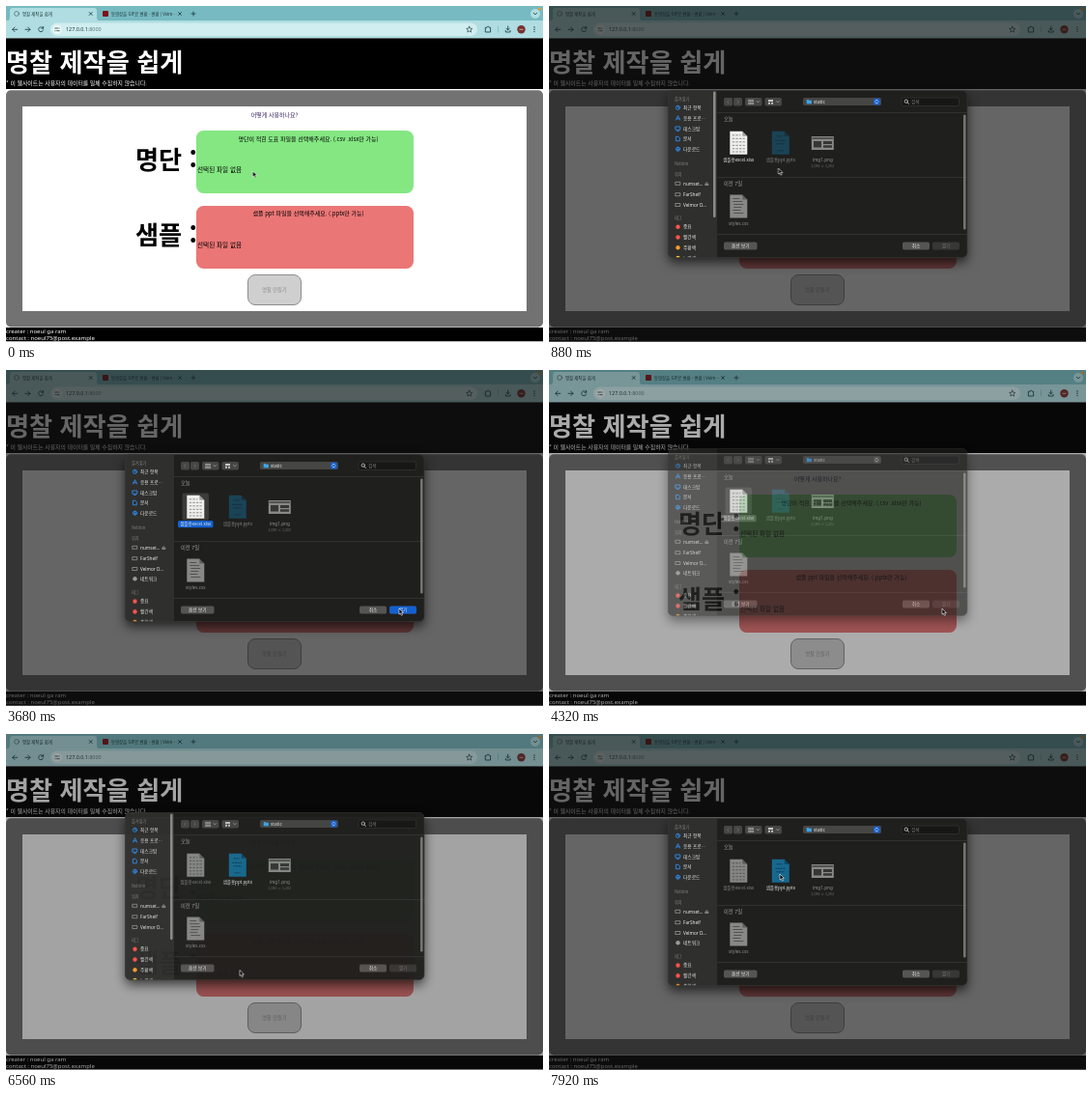
An HTML page that plays this animation: 556x348 px, repeating every 8000 ms.

```html
<!DOCTYPE html>
<html lang="ko">
<head>
<meta charset="utf-8">
<title>명찰 제작을 쉽게</title>
<style>
html, body { margin: 0; width: 100%; height: 100%; overflow: hidden; background: #000; }
svg { display: block; width: 556px; height: 348px; }
text { font: 6px "Noto Sans CJK KR", "Noto Sans CJK", "Noto Sans", sans-serif; white-space: pre; }
.big { font-size: 26.2px; font-weight: 700; }
.file { font-size: 6.6px; }
.latin { font-family: "Noto Sans", "Noto Sans CJK KR", sans-serif; }
.tab { font-size: 4.4px; }
.mid { text-anchor: middle; }
.line { fill: none; stroke: currentColor; stroke-width: .9; stroke-linecap: round; stroke-linejoin: round; }
#dialog text { font-size: 4.7px; font-weight: 500; fill: #ececea; }
#dialog .head { font-size: 4.2px; fill: #81817f; }
#dialog .tiny { font-size: 3.6px; fill: #72726f; }
#dialog .soft { font-size: 5.3px; fill: #a0a09e; }
#dialog .name { font-size: 4.5px; }
.shadow { filter: drop-shadow(0 5px 6px #000a); }

/* One percent of the loop is 80 ms. */
.anim { animation: 8s linear infinite; }
.hard { animation-timing-function: step-end; }
#cursor { animation-name: cursor; }
#dim { animation-name: dim; }
#dialog { animation-name: sheet; }
.before { animation-name: before; }
.after { animation-name: after; }
.sheetFile { animation-name: firstPick; }
.slideFile { animation-name: secondPick; }
.selected { animation-name: selected; }
.ready { animation-name: ready; }
.accent { animation-name: accent; }
.network { animation-name: network; }
.tags { animation-name: tags; }
.sideBar { animation-name: sideBar; }

@keyframes cursor {
  0%, 2% { transform: translate(255.5px, 171px); }
  8%, 13% { transform: translate(237.5px, 168px); }
  21%, 33% { transform: translate(197px, 138px); }
  36% { transform: translate(225px, 158px); }
  41% { transform: translate(360px, 232px); }
  45%, 62% { transform: translate(407px, 247px); }
  66% { transform: translate(330px, 243px); }
  70% { transform: translate(268.5px, 240px); }
  74% { transform: translate(249px, 243px); }
  77%, 85% { transform: translate(242px, 244.5px); }
  88% { transform: translate(241px, 210px); }
  93%, 100% { transform: translate(239px, 145px); }
}
@keyframes dim {
  0%, 3.99% { opacity: 0; }
  4% { opacity: .39; }
  8%, 53% { opacity: .655; }
  54% { opacity: .36; }
  57%, 81.99% { opacity: 0; }
  82% { opacity: .39; }
  86%, 100% { opacity: .655; }
}
@keyframes sheet {
  0%, 3.99% { opacity: 0; transform: translateY(-6px); }
  4% { opacity: .96; transform: translateY(-6px); }
  8%, 52% { opacity: 1; transform: none; }
  54% { opacity: .65; transform: translateY(-6px); }
  57%, 81.99% { opacity: 0; transform: translateY(-6px); }
  82% { opacity: .97; transform: translateY(-6px); }
  86%, 100% { opacity: 1; transform: none; }
}
@keyframes before { 0% { opacity: 1; } 58%, 100% { opacity: 0; } }
@keyframes after { 0% { opacity: 0; } 58%, 100% { opacity: 1; } }
@keyframes firstPick { 0% { opacity: 1; } 60%, 100% { opacity: .5; } }
@keyframes secondPick { 0% { opacity: .5; } 60%, 100% { opacity: 1; } }
@keyframes selected { 0% { opacity: 0; } 23% { opacity: 1; } 60%, 100% { opacity: 0; } }
@keyframes ready { 0% { opacity: 0; } 23% { opacity: 1; } 53%, 100% { opacity: 0; } }
@keyframes accent { 0% { fill: #1460cf; } 53% { fill: #5a5a58; } 60%, 100% { fill: #1460cf; } }
@keyframes network { 0% { opacity: 0; } 13% { opacity: 1; } 82% { opacity: 0; } 90%, 100% { opacity: 1; } }
@keyframes tags {
  0% { transform: none; }
  13% { transform: translateY(10.8px); }
  82% { transform: none; }
  90%, 100% { transform: translateY(10.8px); }
}
@keyframes sideBar {
  0%, 14% { opacity: 1; }
  17%, 81.99% { opacity: 0; }
  82%, 89% { opacity: 1; }
  92%, 100% { opacity: 0; }
}
</style>
</head>
<body>
<svg viewBox="0 0 556 348">
  <defs>
    <clipPath id="sheetClip"><rect x="123.5" y="87.5" width="309.5" height="173" rx="5"/></clipPath>
    <path id="page" d="M-9-12H4L9-7V12H-9Z"/>
    <path id="fold" d="M4-12V-7H9Z" fill="#0005"/>
    <path id="folder" d="M-2.6-2h2l.8.8h2.4v3.4h-5.2Z"/>
  </defs>

  <!-- Browser -->
  <rect width="556" height="35" fill="#77bac1"/>
  <path d="M2 15.5Q4 15 4 12V5Q4 2 7 2H91Q94 2 94 5V12Q94 15 96 15.5Z" fill="#afdde1"/>
  <rect y="15" width="556" height="19" fill="#afdde1"/>
  <rect x="46" y="17.5" width="442" height="13.5" rx="6.7" fill="#d0edef"/>
  <g color="#24474c" fill="#1d3538">
    <circle cx="11" cy="8" r="2.4" class="line" opacity=".6"/>
    <text x="17" y="9.7" class="tab">명찰 제작을 쉽게</text>
    <path class="line" d="M86.2 6.5l3 3m0-3l-3 3M178.5 6.5l3 3m0-3l-3 3M192 8h4m-2-2v4"/>
    <rect x="100" y="5" width="6" height="6" rx="1" fill="#7d1417"/>
    <text x="109" y="9.7" class="tab">동영상을 GIF로 변환 - 변환 | Velm…</text>
    <circle cx="548" cy="8" r="5" fill="#afdde1"/>
    <path class="line" d="M546.3 7.2l1.7 1.7 1.7-1.7"/>
    <circle cx="552.5" cy="3" r="1.5" fill="#f29a24"/>
    <path class="line" d="M11.7 24.3H6.8m2.2-2.3l-2.3 2.3 2.3 2.3M20 24.3h4.9m-2.2-2.3l2.3 2.3-2.3 2.3M38.4 23a2.5 2.5 0 1 0 .2 2M38.6 21.4V23.2h-1.8"/>
    <circle cx="53" cy="24.3" r="4.6" fill="#f0fbfb"/>
    <path class="line" d="M50.8 23h2.7m1.4 0h.3M50.8 25.7h.3m1.6 0h2.5"/>
    <text x="62" y="26.3" class="latin" style="font-size:5.4px">127.0.0.1<tspan fill="#55777b">:8000</tspan></text>
    <path class="line" style="stroke-width:.7" d="M479.7 21.2l.9 2 2.2.2-1.7 1.5.5 2.2-1.9-1.2-1.9 1.2.5-2.2-1.7-1.5 2.2-.2Z"/>
    <path class="line" d="M496.7 22.3h1.3a1.1 1.1 0 0 1 2.2 0h1.4v4.7h-4.9Z"/>
    <path d="M509.5 20.5v7" stroke="#79b6bd" stroke-width=".7"/>
    <path class="line" d="M519.7 21v3.8m-1.7-1.6l1.7 1.7 1.7-1.7M517.3 25.5v1.5h4.8v-1.5"/>
    <circle cx="533.5" cy="24.3" r="4.2" fill="#76322f"/>
    <path d="M531.5 24.3h4" stroke="#c7a5a0" stroke-width="1"/>
    <circle cx="547" cy="22" r=".7"/><circle cx="547" cy="24.3" r=".7"/><circle cx="547" cy="26.6" r=".7"/>
  </g>

  <!-- Page -->
  <rect y="33.4" width="556" height="314.6" fill="#fff"/>
  <rect y="33.4" width="556" height="52.6"/>
  <rect y="333" width="556" height="14.3"/>
  <g fill="#fff">
    <text x="0" y="68.3" class="big">명찰 제작을 쉽게</text>
    <text x="0" y="82.2" style="font-size:5.9px">* 이 웹사이트는 사용자의 데이터를 일체 수집하지 않습니다.</text>
    <text x="0" y="338.5" class="latin">creater : noeul ga ram</text>
    <text x="0" y="346" class="latin">contact : noeul75@post.example</text>
  </g>
  <rect y="87.2" width="556" height="245.3" rx="5" fill="#727272"/>
  <rect x="17" y="104" width="522" height="212" fill="#fff"/>
  <text x="278" y="115.2" class="mid" fill="#33205f">어떻게 사용하나요?</text>
  <text x="134" y="169.3" class="big">명단 :</text>
  <text x="134" y="247.3" class="big">샘플 :</text>
  <rect x="197" y="129" width="225" height="65" rx="7.5" fill="#84e782"/>
  <rect x="197" y="207" width="225" height="65" rx="7.5" fill="#eb7676"/>
  <text x="313" y="139.6" class="mid">명단이 적힌 도표 파일을 선택해주세요. (.csv .xlsx만 가능)</text>
  <text x="313" y="217.4" class="mid">샘플 ppt 파일을 선택해주세요. (.pptx만 가능)</text>
  <text x="198" y="171.5" class="file anim hard before">선택된 파일 없음</text>
  <text x="198" y="171.5" class="file anim hard after">샘플용excel.xlsx</text>
  <text x="198" y="249.5" class="file">선택된 파일 없음</text>
  <rect x="250.5" y="278.5" width="55" height="31" rx="7.5" fill="#cfcfcf" stroke="#8d8d8d"/>
  <text x="278" y="295.8" class="mid" fill="#8b8b8b" style="font-size:5.2px">명찰 만들기</text>

  <rect id="dim" class="anim" width="556" height="348" fill="#151515"/>

  <!-- File chooser -->
  <g id="dialog" class="anim">
    <rect x="123.5" y="87.5" width="309.5" height="173" rx="5" fill="#1f1f1d" class="shadow"/>
    <g clip-path="url(#sheetClip)">
      <rect x="123" y="87" width="51" height="174" fill="#2f2f2d"/>

      <text x="130" y="97.7" class="head">즐겨찾기</text>
      <g color="#2f8df0">
        <circle cx="133.5" cy="105.3" r="2.1" class="line"/>
        <path class="line" d="M133.5 104v1.4l1 .6M131.5 118l2-4.3 2 4.3m-3.4-1.2h2.8M131.2 125h4.6v3.2h-4.6Zm1.5 4.5h1.6M131.8 135.3h2.2l1.3 1.3v3.2h-3.5Z"/>
        <circle cx="133.5" cy="148.2" r="2.1" class="line"/>
        <path class="line" d="M133.5 146.9v2.4m-.9-.8l.9.9.9-.9"/>
      </g>
      <text x="139" y="107">최근 항목</text>
      <text x="139" y="117.8">응용 프로…</text>
      <text x="139" y="128.6">데스크탑</text>
      <text x="139" y="139.3">문서</text>
      <text x="139" y="150">다운로드</text>
      <text x="130" y="164.7" class="head">Nebbin</text>
      <text x="130" y="176.2" class="head">위치</text>
      <path class="line" color="#a4a4a1" style="stroke-width:.7" d="M131.2 182.3h4.6v3h-4.6ZM131.2 193.7h4.6v3h-4.6ZM131.2 204.5h4.6v3h-4.6ZM161.8 185.5h3m-3-1.2l1.5-1.8 1.5 1.8Z"/>
      <text x="139" y="185.8" class="latin">numset…</text>
      <text x="139" y="196.7" class="latin">FarShelf</text>
      <text x="139" y="207.5" class="latin">Velmor D…</text>
      <g class="anim hard network">
        <circle cx="133.5" cy="216.3" r="2.2" fill="#9a9a98"/>
        <text x="139" y="218">네트워크</text>
      </g>
      <g class="anim hard tags">
        <text x="130" y="220.9" class="head">태그</text>
        <circle cx="133.5" cy="228.7" r="2.2" fill="#ff5350"/>
        <circle cx="133.5" cy="239.5" r="2.2" fill="#ff5350"/>
        <circle cx="133.5" cy="250.2" r="2.2" fill="#fb9a2b"/>
        <circle cx="133.5" cy="261" r="2.2" fill="#f8ce3c"/>
        <text x="139" y="230.4">중요</text>
        <text x="139" y="241.2">빨간색</text>
        <text x="139" y="251.9">주황색</text>
        <text x="139" y="262.7">노란색</text>
      </g>
      <rect x="170" y="88.5" width="2.6" height="130.5" rx="1.3" fill="#8a8a87" class="anim sideBar"/>

      <g fill="#464644">
        <rect x="181" y="95" width="9" height="8.5" rx="1.7"/>
        <rect x="191" y="95" width="9" height="8.5" rx="1.7"/>
        <rect x="203" y="95" width="17.5" height="8.5" rx="1.7"/>
        <rect x="223.5" y="95" width="17.5" height="8.5" rx="1.7"/>
        <rect x="263" y="95" width="81" height="8" rx="1.7"/>
      </g>
      <g color="#b9b9b6">
        <path class="line" opacity=".45" style="stroke-width:.7" d="M186 97.7l-1.5 1.5 1.5 1.5M195 97.7l1.5 1.5-1.5 1.5"/>
        <path class="line" style="stroke-width:.7" d="M207 97.3h1.6v1.5H207Zm3 0h1.6v1.5H210Zm-3 2.8h1.6v1.5H207Zm3 0h1.6v1.5H210ZM215.2 98.6l1.2 1.2 1.2-1.2M235.7 98.6l1.2 1.2 1.2-1.2"/>
        <path d="M227 97h5v2h-5Zm0 2.7h2v2h-2Zm3 0h2v2h-2Z" fill="#c5c5c2"/>
        <rect x="365" y="95" width="59.5" height="8.5" rx="1.7" fill="#171716" stroke="#3b3b39" stroke-width=".6"/>
        <circle cx="369.8" cy="98.7" r="1.7" class="line"/>
        <path class="line" d="M371.1 100l1.5 1.5"/>
      </g>
      <use href="#folder" x="269.3" y="99" fill="#3ba5e8"/>
      <text x="274" y="100.8" class="latin">static</text>
      <rect x="336" y="95.8" width="6.6" height="6.6" rx="1.4" class="anim hard accent"/>
      <path class="line" color="#fff" style="stroke-width:.7" d="M338 98.4l1.3-1.3 1.3 1.3m-2.6 1.4l1.3 1.3 1.3-1.3"/>
      <text x="375" y="100.9" style="fill:#777774">검색</text>

      <path d="M174 110.5H433M174 177.5H433M174 236.5H433" stroke="#373735" stroke-width=".8"/>
      <text x="181" y="119.2" class="soft">오늘</text>
      <text x="181" y="185.8" class="soft">이전 7일</text>

      <g class="anim hard selected">
        <rect x="182.5" y="127.5" width="27.5" height="28" rx="2" fill="#3b3b39"/>
        <rect x="178" y="156" width="36.5" height="7.3" rx="1.5" class="anim hard accent"/>
      </g>
      <g class="anim hard sheetFile">
        <g transform="translate(196.3 141.8)">
          <use href="#page" fill="#efefed"/><use href="#fold"/>
          <path d="M-6.5-8H2M-6.5-4.5H6.5M-6.5-1H6.5M-6.5 2.5H6.5M-6.5 6H6.5M-6.5 9.2H6.5" stroke="#8c8c8a" stroke-width="1" stroke-dasharray="2.4 1.2"/>
        </g>
        <text x="196.3" y="161.4" class="mid name">샘플용excel.xlsx</text>
      </g>
      <g class="anim hard slideFile">
        <g transform="translate(239.8 141.8)">
          <use href="#page" fill="#17688f"/><use href="#fold"/>
          <path d="M-4-7H2M-5.5-2.5H5M-4.5 1H4M-3 8H3" stroke="#0c3a55" stroke-width="1" stroke-dasharray="2 .7"/>
        </g>
        <text x="239.8" y="161.4" class="mid name">샘플용ppt.pptx</text>
      </g>
      <g opacity=".55">
        <rect x="271.8" y="135" width="23" height="14" fill="#dededc"/>
        <path d="M272.5 137h21.6" stroke="#555" stroke-width="1.4"/>
        <path d="M274 140h8v6.5h-8Zm10 0h9v3h-9Zm0 4.2h9v2.5h-9Z" fill="#4a4a48"/>
        <text x="283.3" y="161.4" class="mid latin">img1.png</text>
      </g>
      <text x="283.3" y="166.7" class="mid tiny">2,080 × 1,202</text>
      <g opacity=".55">
        <g transform="translate(196.3 207.5)">
          <use href="#page" fill="#dededc"/><use href="#fold"/>
          <path d="M-6-8H1M-6-5H4M-5-2H5M-5 1H3M-6 4H2M-5 7H5" stroke="#62625f" stroke-width=".8"/>
        </g>
        <text x="196.3" y="227.2" class="mid latin">styles.css</text>
      </g>
      <rect x="429" y="112.5" width="2.6" height="119" rx="1.3" fill="#747472"/>

      <rect x="181" y="244.5" width="34.5" height="8" rx="1.7" fill="#555553"/>
      <rect x="366" y="244.5" width="28" height="8" rx="1.7" fill="#555553"/>
      <rect x="397" y="244.5" width="28" height="8" rx="1.7" fill="#373735"/>
      <text x="198.3" y="250.3" class="mid">옵션 보기</text>
      <text x="380" y="250.3" class="mid">취소</text>
      <text x="411" y="250.3" class="mid" style="fill:#777774">열기</text>
      <g class="anim hard ready">
        <rect x="397" y="244.5" width="28" height="8" rx="1.7" fill="#1460cf"/>
        <text x="411" y="250.3" class="mid">열기</text>
      </g>
    </g>
    <rect x="123.5" y="87.5" width="309.5" height="173" rx="5" fill="none" stroke="#3c3c3a" stroke-width=".6"/>
  </g>

  <path id="cursor" class="anim" d="M0 0V6.1L1.4 4.9 2.4 7.2 3.5 6.7 2.5 4.5H4.4Z" stroke="#fff" stroke-width=".6"/>
</svg>
</body>
</html>
```
